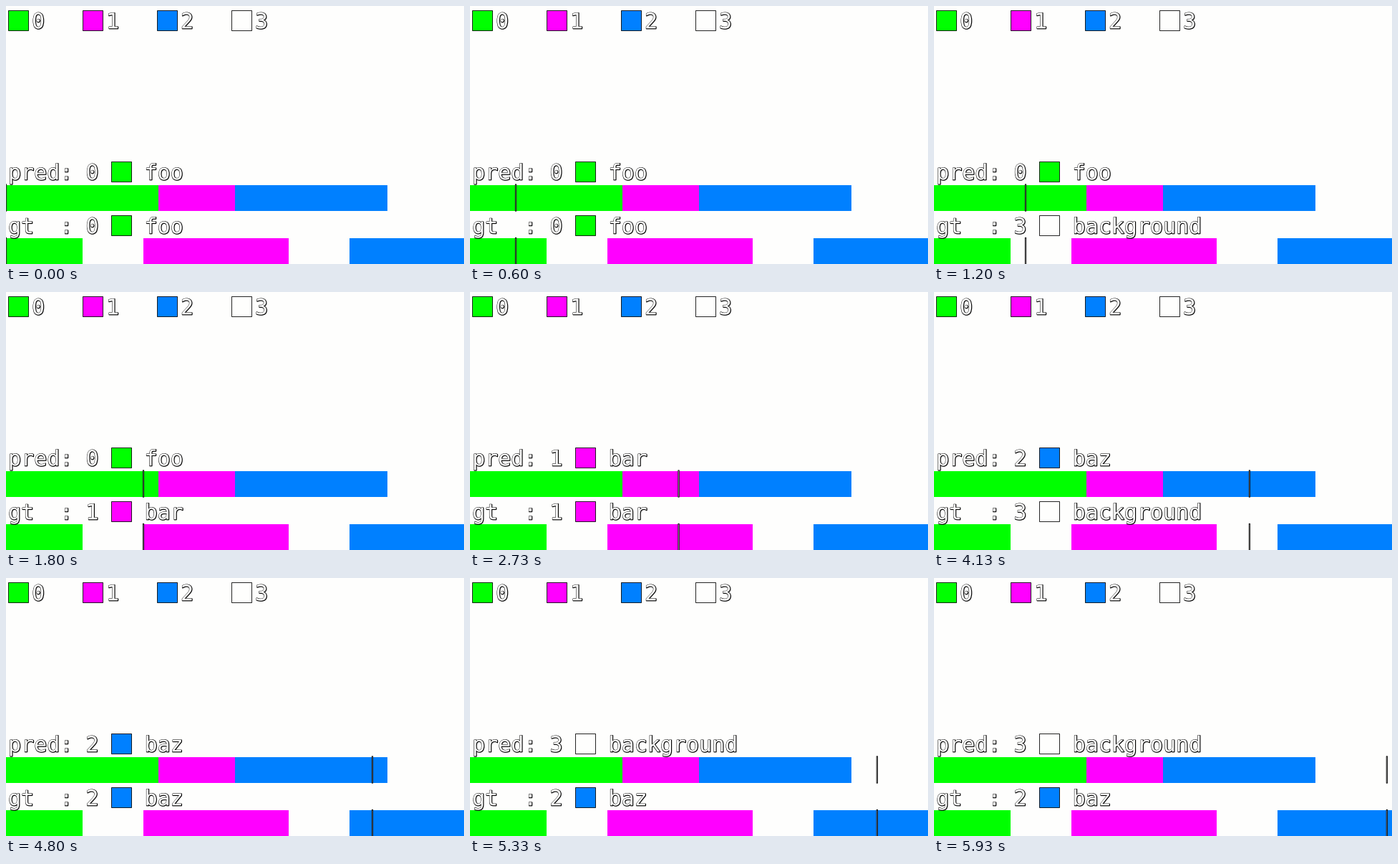
Write a matplotlib script that moves like this. It is 640x360 px and loops after 5990 ms.

```python
import matplotlib.pyplot as plt
from matplotlib.animation import FuncAnimation
from matplotlib.patches import PathPatch, Rectangle
from matplotlib.textpath import TextPath
from matplotlib.transforms import Affine2D

W, H, DPI = 640, 360, 100
FRAMES, LOOP_MS = 90, 5990
PX = 72 / DPI

PAPER = "#fefefd"
COLORS = ["#00ff00", "#ff00ff", "#0080ff", PAPER]
NAMES = ["foo", "bar", "baz", "background"]
FONT = {"family": "DejaVu Sans Mono"}
BAR_H, SWATCH = 36, 28
BASELINE = 24.75  # below the top of the swatch beside the text

# Each track: label, swatch top, bar top, [(class, end in frames), ...]
TRACKS = [
    ("pred", 217.5, 249.5, [(0, 30), (1, 45), (2, 75), (3, 90)]),
    ("gt  ", 292.5, 324, [(0, 15), (3, 27), (1, 55.5), (3, 67.5), (2, 90)]),
]

fig = plt.figure(figsize=(W / DPI, H / DPI), dpi=DPI, facecolor=PAPER)
ax = fig.add_axes([0, 0, 1, 1])
ax.set_xlim(0, W)
ax.set_ylim(H, 0)
ax.axis("off")


def box(x, y, w, h, color, line=0, z=1):
    edge = "black" if line else "none"
    return ax.add_patch(Rectangle((x, y), w, h, fc=color, ec=edge, lw=line * PX,
                                  zorder=z, snap=False))


def write(x, top, text):
    """White letters over a black rim that is heavier at the lower right."""
    glyphs = TextPath((0, 0), text, size=30, prop=FONT)

    def layer(shift, z, **style):
        place = Affine2D().scale(1, -1).translate(x + shift, top + BASELINE + shift)
        return ax.add_patch(PathPatch(glyphs.transformed(place), zorder=z, snap=False,
                                      joinstyle="round", **style))

    return [layer(0.35, 3, fc="black", ec="black", lw=1.6 * PX),
            layer(0, 4, fc=PAPER, lw=0)]


def swatch(x, y, cls):
    return box(x, y, SWATCH, SWATCH, COLORS[cls], line=0.85, z=2)


def class_at(segments, i):
    return next(cls for cls, end in segments if i < end)


class Track:
    def __init__(self, label, top, bar_top, segments):
        self.segments = segments
        start = 0
        for cls, end in segments:
            stop = round(end * W / FRAMES)
            box(start, round(bar_top), stop - start, BAR_H, COLORS[cls])
            start = stop
        write(3, top, label + ":")
        self.captions = [
            [*write(3 + 6 * 18.06, top, str(cls)),
             swatch(147.5, top, cls),
             *write(193.5, top, name)]
            for cls, name in enumerate(NAMES)
        ]
        self.cursor = box(0, bar_top - 0.7, 1.4, BAR_H + 1.4, PAPER, line=0.9, z=5)

    def show(self, i):
        current = class_at(self.segments, i)
        for cls, parts in enumerate(self.captions):
            for part in parts:
                part.set_visible(cls == current)
        self.cursor.set_x(i * W / FRAMES - 0.7)


for cls in range(len(NAMES)):
    swatch(3.5 + 104 * cls, 6.5, cls)
    write(36 + 104 * cls, 6.5, str(cls))

tracks = [Track(*spec) for spec in TRACKS]


def update(i):
    for track in tracks:
        track.show(i)
    return []


anim = FuncAnimation(fig, update, frames=FRAMES, interval=LOOP_MS / FRAMES,
                     repeat=True, repeat_delay=0, blit=False)
plt.show()
```
